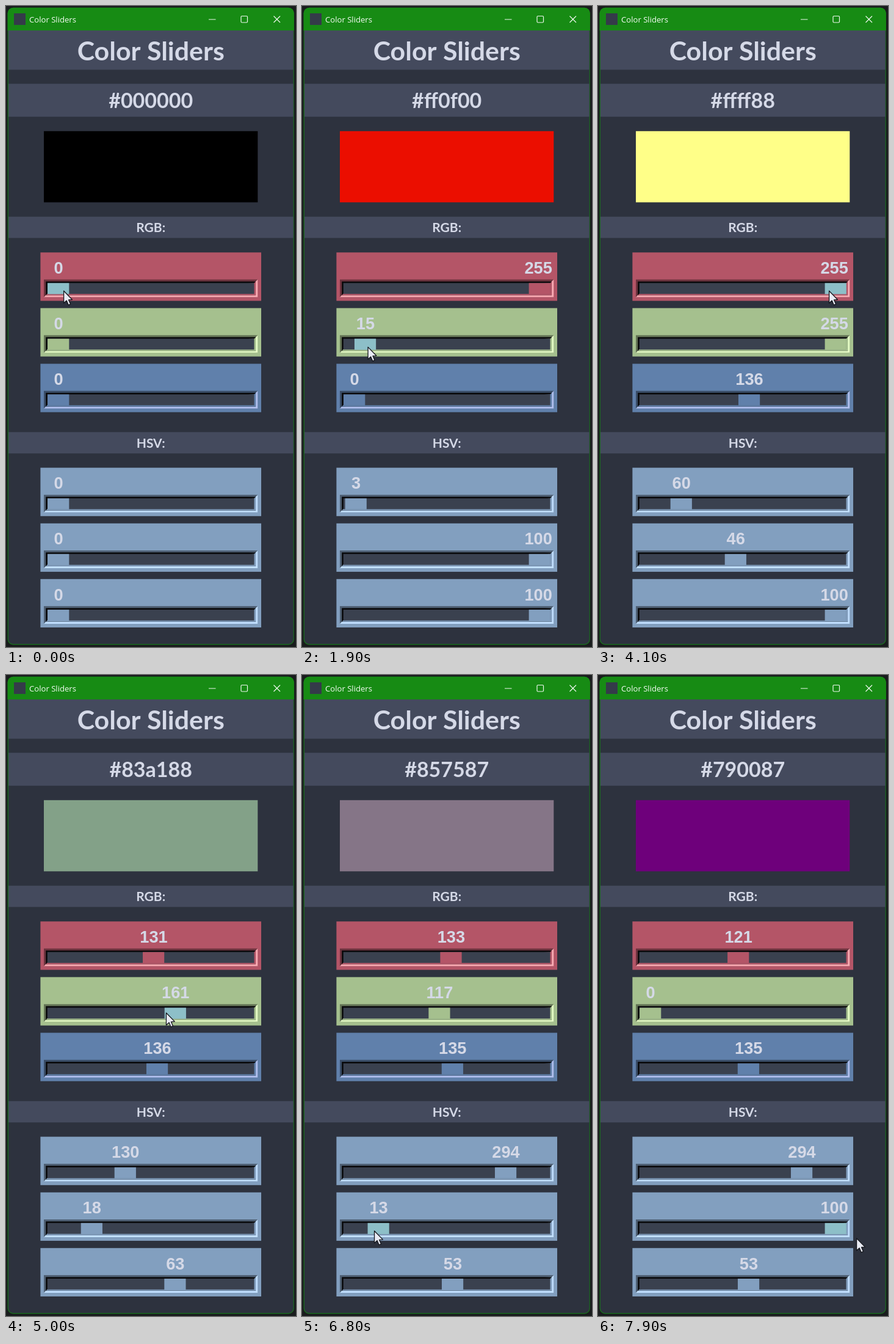
These frames come from a looping animation (475 px wide and 1049 px high, 8000 ms). An HTML page with a canvas:

```html
<!DOCTYPE html>
<html lang="en">
<head>
<meta charset="utf-8">
<title>Color Sliders</title>
<style>
  html, body { margin: 0; width: 100%; height: 100%; overflow: hidden; background: #191c1d; }
  canvas { display: block; width: 475px; height: 1049px; }
</style>
</head>
<body>
<canvas id="stage"></canvas>
<script>
const W = 475, H = 1049, LOOP = 8000, STEP = 100;
const canvas = document.getElementById('stage');
const ctx = canvas.getContext('2d');
const dpr = window.devicePixelRatio || 1;
canvas.width = Math.round(W * dpr);
canvas.height = Math.round(H * dpr);

const INK = '#d5d9e7', BODY = '#2d323e', BAND = '#444a5d', TROUGH = '#3a414f';
const HOT = '#8dbfc8', TITLE = '#178b14', EDGE = '#1b6a20';
const RED = '#b45567', GREEN = '#a5c08e', BLUE = '#6080ab', STEEL = '#829fbf';
const LEFT = 68.1, TRAVEL = 303.5, KNOB = 35.2, ROW = 91.1;

const sliders = [RED, GREEN, BLUE, STEEL, STEEL, STEEL].map((color, i) => ({
  color,
  y: (i < 3 ? 403.3 : 755.6) + i % 3 * ROW,
  max: i < 3 ? 255 : i === 3 ? 360 : 100
}));

// grab: where on the knob the pointer takes hold; dx: how far it pulls.
const drags = [
  { id: 0, from: 200, to: 1100, grab: 26.5, dx: 317 },
  { id: 1, from: 1800, to: 2500, grab: 22, dx: 324 },
  { id: 2, from: 3050, to: 3700, grab: 24, dx: 161.9 },
  { id: 0, from: 4100, to: 4350, grab: 7, dx: -147.6 },
  { id: 1, from: 4600, to: 5240, grab: 2.3, dx: -163 },
  { id: 3, from: 5900, to: 6300, grab: 18, dx: 9.3 },
  { id: 4, from: 6800, to: 7900, grab: 11, dx: 305 }
];

const clamp = (v, lo, hi) => Math.min(hi, Math.max(lo, v));
const smooth = p => p * p * (3 - 2 * p);
const mix = (a, b, p) => a + (b - a) * p;
const css = c => `rgb(${c.map(Math.round).join(',')})`;
const channels = hex => [1, 3, 5].map(i => parseInt(hex.slice(i, i + 2), 16));
const knobX = (s, value) => LEFT + value / s.max * TRAVEL;

function rgbToHsv([r, g, b]) {
  const max = Math.max(r, g, b), d = max - Math.min(r, g, b);
  let h = 0;
  if (d) {
    if (max === r) h = (g - b) / d + 6;
    else if (max === g) h = (b - r) / d + 2;
    else h = (r - g) / d + 4;
  }
  return [h % 6 * 60, max ? d / max * 100 : 0, max / 2.55].map(v => Math.floor(v + 1e-6));
}

function hsvToRgb([h, s, v]) {
  return [5, 3, 1].map(n => {
    const k = (n + h / 60) % 6;
    const f = v / 100 * (1 - s / 100 * clamp(Math.min(k, 4 - k), 0, 1));
    return Math.floor(f * 255 + 1e-6);
  });
}

function setValue(vals, id, value) {
  const next = [...vals];
  next[id] = Math.round(clamp(value, 0, sliders[id].max));
  const rgb = next.slice(0, 3), hsv = next.slice(3);
  return id < 3 ? [...rgb, ...rgbToHsv(rgb)] : [...hsvToRgb(hsv), ...hsv];
}

function stateAt(t) {
  let vals = sliders.map(() => 0), x, y, last = null;
  for (const { id, from, to, grab, dx } of drags) {
    const s = sliders[id];
    const px = knobX(s, vals[id]) + grab, py = s.y + 63;
    if (t < from && last) {
      // Between drags the pointer crosses sideways first, then drops.
      const p = (t - last) / (from - last);
      return { vals, x: mix(x, px, smooth(p)), y: mix(y, py, p * p), active: -1 };
    }
    const pull = dx * smooth(clamp((t - from) / (to - from), 0, 1));
    vals = setValue(vals, id, vals[id] + pull / TRAVEL * s.max);
    x = px + pull;
    y = py + pull * 0.04;
    last = to;
    if (t <= to) return { vals, x, y, active: id };
  }
  return { vals, x, y, active: -1 };
}

function rect(x0, y0, x1, y1, fill) {
  ctx.fillStyle = fill;
  ctx.fillRect(x0, y0, x1 - x0, y1 - y0);
}

function poly(points, fill) {
  ctx.beginPath();
  points.forEach(([x, y]) => ctx.lineTo(x, y));
  ctx.closePath();
  ctx.fillStyle = fill;
  ctx.fill();
}

function text(str, x, y, font, align = 'center', fill = INK) {
  ctx.font = font;
  ctx.textAlign = align;
  ctx.fillStyle = fill;
  ctx.fillText(str, x, y);
}

function bevel(x0, y0, x1, y1, w, dark, light) {
  rect(x0, y0, x1, y1, dark);
  poly([[x0, y1], [x0 + w, y1 - w], [x1 - w, y0 + w], [x1, y0], [x1, y1]], light);
}

function drawSlider({ y, max, color }, value, kx, hot) {
  const rgb = channels(color);
  const dark = css(rgb.map(c => c * 0.6));
  const light = css(rgb.map(c => Math.min(255, Math.max(c * 1.4, (c + 255) / 2))));
  rect(56.4, y, 418, y + 79.2, color);
  bevel(62, y + 44.3, 412.3, y + 73.2, 3.2, dark, light);
  bevel(65.2, y + 47.5, 409.1, y + 70, 2.6, '#09090b', color);
  rect(67.8, y + 50.1, 406.5, y + 67.9, TROUGH);
  rect(kx, y + 50.1, kx + KNOB, y + 68.2, hot ? HOT : color);

  ctx.font = 'bold 27.2px "Liberation Sans", Arial, sans-serif';
  const half = ctx.measureText(value).width / 2;
  text(value, Math.min(kx + KNOB / 2 + 0.4, 409.8 - half), y + 34.7, ctx.font);
}

function drawWindow() {
  rect(0, 0, W, H, '#191c1d');
  ctx.save();
  ctx.beginPath();
  ctx.roundRect(2.6, 2.8, 469.2, 1042.6, 9);
  ctx.clip();
  rect(0, 0, W, H, EDGE);
  rect(0, 0, W, 40, TITLE);
  ctx.beginPath();
  ctx.roundRect(4, 40, 466.6, 1004, [0, 0, 8, 8]);
  ctx.fillStyle = BODY;
  ctx.fill();
  ctx.restore();

  rect(13, 12, 32, 31, '#343b49');
  text('Color Sliders', 38, 27, '13.1px "Open Sans", sans-serif', 'left', '#f4fbf4');
  ctx.strokeStyle = '#eef8ee';
  ctx.lineWidth = 1.2;
  ctx.beginPath();
  ctx.moveTo(332, 22); ctx.lineTo(343.5, 22);
  ctx.moveTo(438.5, 16.5); ctx.lineTo(449, 27);
  ctx.moveTo(449, 16.5); ctx.lineTo(438.5, 27);
  ctx.roundRect(385, 16.5, 10.5, 10.5, 1.5);
  ctx.stroke();
}

function drawHeading(str, top, bottom, size) {
  rect(4, top, 470.6, bottom, BAND);
  text(str, 237.2, (top + bottom) / 2 + size * 0.385, `bold ${size}px Lato, sans-serif`);
}

function drawPointer(x, y) {
  const shape = [[0, 0], [0, 20], [4.6, 15.8], [7.6, 23], [11, 21.5], [8, 14.6], [13.8, 14.2]];
  ctx.lineJoin = 'round';
  poly(shape.map(([a, b]) => [x + a, y + b]), '#e9ebf4');
  ctx.strokeStyle = '#15171d';
  ctx.lineWidth = 1.3;
  ctx.stroke();
}

function draw(t) {
  const { vals, x, y, active } = stateAt(t);
  const rgb = vals.slice(0, 3);
  ctx.setTransform(dpr, 0, 0, dpr, 0, 0);
  drawWindow();

  const hex = '#' + rgb.map(v => v.toString(16).padStart(2, '0')).join('');
  drawHeading('Color Sliders', 40, 104.3, 42.9);
  drawHeading(hex, 127.3, 181.2, 34);
  drawHeading('RGB:', 344.8, 379.6, 21);
  drawHeading('HSV:', 697.3, 732.2, 21);

  // Colours with little green show slightly darker.
  const shade = 0.91 + 0.09 * Math.min(1, rgb[1] / 110);
  rect(62, 204.8, 412.3, 321.3, css(rgb.map(v => v * shade)));

  sliders.forEach((s, i) => {
    const kx = knobX(s, vals[i]);
    const over = x >= kx && x <= kx + KNOB && y >= s.y + 50 && y <= s.y + 68;
    drawSlider(s, vals[i], kx, over || active === i);
  });
  drawPointer(x, y);
}

const start = performance.now();
function tick() {
  const t = (performance.now() - start) % LOOP;
  draw(Math.floor(t / STEP) * STEP);
  requestAnimationFrame(tick);
}
tick();
</script>
</body>
</html>
```
